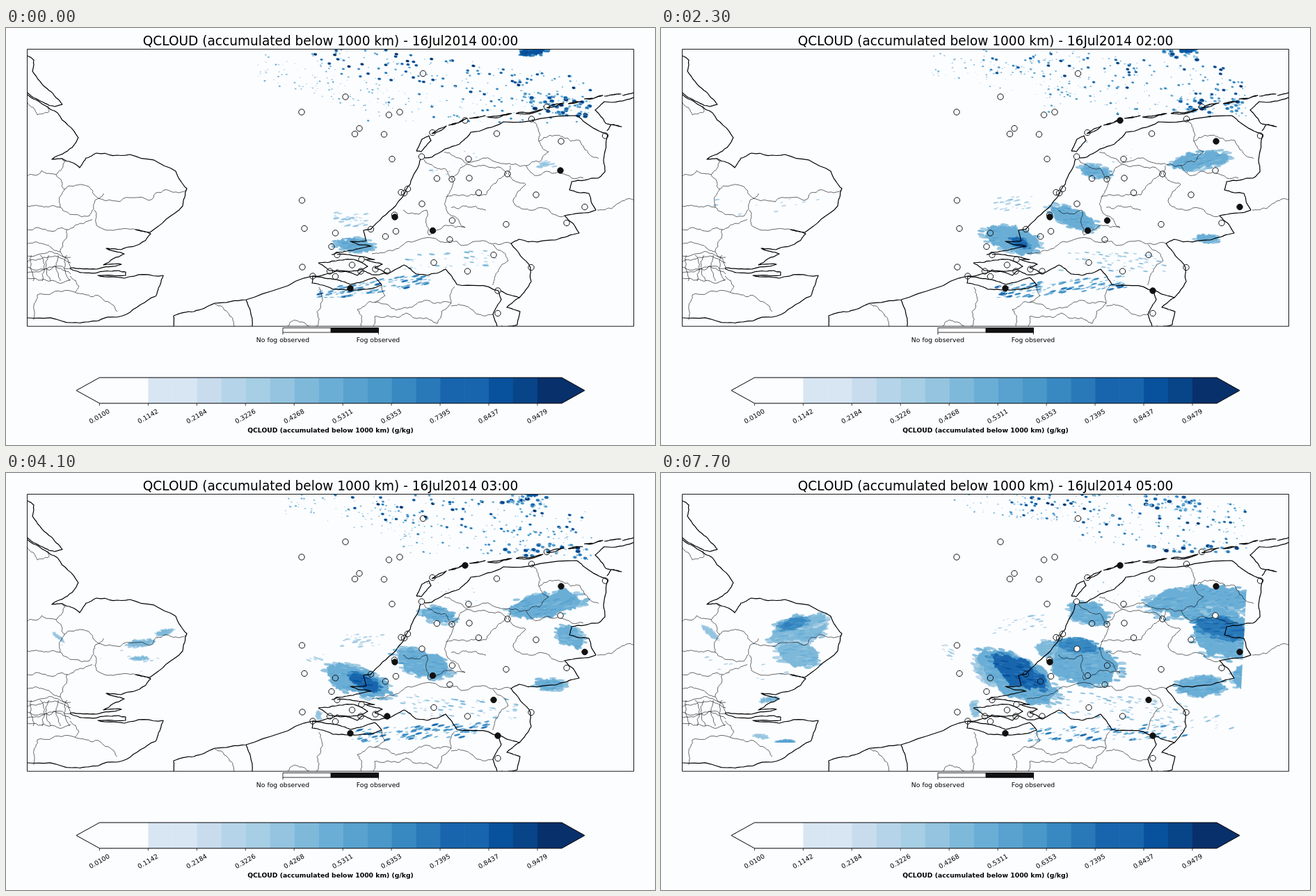
Write an HTML page that moves like this. It is 933 px wide and 600 px high and loops after 8000 ms.

```html
<!DOCTYPE html>
<html lang="en">
<head>
<meta charset="utf-8">
<title>Cloud water forecast</title>
<style>
html, body { margin: 0; width: 100%; height: 100%; overflow: hidden; background: #fcfdff; }
svg { display: block; width: 100vw; height: 100vh; }
text { font: 9.27px "DejaVu Sans", sans-serif; text-anchor: middle; fill: #000; }
#title { font-size: 18.55px; }
.bold { font-weight: bold; }
#coast, #border { fill: none; stroke: #000; stroke-linejoin: round; }
#coast { stroke-width: 1.2; }
#border { stroke-width: .6; }
#stations circle { stroke: #111; stroke-width: 1; }
</style>
</head>
<body>
<svg viewBox="0 0 933 600">
<defs>
  <clipPath id="domain"><path d="M31 31H849L834 312 830 388H31z"/></clipPath>
  <clipPath id="frame"><path d="M31 31H902V429H31z"/></clipPath>
</defs>
<g id="clouds" clip-path="url(#domain)"></g>
<g clip-path="url(#frame)">
<g id="coast">
  <polyline points="31,40 40,46 38,62 62,90 81,110 70,113 42,101 31,93"/>
  <polyline points="31,96 55,111 74,122 104,158 95,172 66,189 81,188 106,201 115,187 130,180 178,182 244,206 260,231 254,256 207,294 186,290"/>
  <polyline points="186,290 208,296 200,306 165,319 144,317 170,325 140,341 166,340 130,347 92,345"/>
  <polyline points="92,346 110,352 150,350 172,351 172,356 132,356 170,360 226,356 221,371 215,386 173,412 118,423 95,424 31,417"/>
  <polyline points="241,429 241,414 270,408 300,396 345,391 441,357 475,362 495,369 530,359 540,370 505,377 470,376 440,367 441,357"/>
  <polyline points="345,391 354,418 354,429"/>
  <polyline points="449,338 475,335 500,333 520,343 497,350 465,349 449,338"/>
  <polyline points="441,357 466,353 476,348 505,356 513,349 526,355 548,353"/>
  <polyline points="476,326 512,329 530,333 516,333 541,340 530,345 548,353"/>
  <polyline points="468,326 490,321 525,314 495,307 518,306 514,291 524,290 560,256 581,225 597,186 612,186"/>
  <polyline points="612,186 652,167 668,150 715,135 820,126 834,137 865,154 859,190 861,207 851,216 813,221 810,233 838,238 848,262 803,270 824,295 790,305 738,304 726,310 754,345 755,365 738,388 711,378"/>
  <polyline points="902,100 860,106 847,118 862,137 885,142 870,139 864,148"/>
  <polyline points="590,177 598,160 608,155 611,162 597,178 590,177"/>
  <polyline points="612,152 633,141 622,149 612,152"/>
  <polyline points="636,140 663,130 648,137 636,140"/>
  <polyline points="666,130 689,126 666,130"/>
  <polyline points="692,128 727,123 708,129 692,128"/>
  <polyline points="733,123 772,117 745,124 733,123"/>
  <polyline points="777,115 802,108 777,115"/>
  <polyline points="808,109 829,106 808,109"/>
  <polyline points="831,102 858,97 831,102"/>
  <polyline points="860,98 884,95 860,98"/>
  <polyline points="886,97 902,93"/>
  <polyline points="548,353 572,341 590,354 605,356 632,347 648,369 708,378 712,390 700,412 706,429"/>
  <polyline points="738,388 720,402 739,408 735,427 712,429"/>
</g>
<g id="border">
  <polyline points="31,107 45,125 62,120 60,112"/>
  <polyline points="31,213 72,211 85,192 80,187"/>
  <polyline points="72,211 84,232 120,229 125,238 205,248 259,233"/>
  <polyline points="84,232 78,258 120,270 128,248 140,238"/>
  <polyline points="31,256 78,258"/>
  <polyline points="127,262 130,284 186,290"/>
  <polyline points="31,290 88,290 124,275"/>
  <polyline points="88,290 78,322 93,345"/>
  <polyline points="31,310 58,312 78,322"/>
  <polyline points="92,357 105,372 100,380"/>
  <polyline points="40,420 45,384 115,384 160,408"/>
  <polyline points="756,131 766,163 800,156 825,162 852,188"/>
  <polyline points="766,163 780,178 748,198 765,212 830,216"/>
  <polyline points="748,198 716,195 662,195 657,190 630,179"/>
  <polyline points="725,198 722,210 747,225 729,249 758,262 803,270"/>
  <polyline points="641,217 660,197 720,209 690,240 633,243 641,217 630,202 597,186"/>
  <polyline points="571,262 605,262 608,298 660,287 633,262 633,243"/>
  <polyline points="640,258 660,256 690,262"/>
  <polyline points="526,325 560,318 625,308 655,313 726,310"/>
  <polyline points="700,312 722,335 708,350 700,370"/>
  <polyline points="450,373 455,390 447,429"/>
  <polyline points="540,370 545,385 505,405 510,429"/>
  <polyline points="530,395 580,402 640,396 645,372"/>
  <polyline points="640,396 620,425 575,410 530,415 528,429"/>
  <polyline points="640,400 680,412 700,412"/>
  <polyline points="300,397 328,429"/>
  <polyline points="405,429 415,420 447,429"/>
  <polyline points="850,262 870,260 902,247"/>
</g>
</g>
<g id="stations"></g>
<path d="M30.5 30.5H902.5V429.2H30.5z" fill="none" stroke="#000" stroke-width=".9"/>
<path d="M398 431.5H535.5V438H398z" fill="#fff" stroke="#000" stroke-width=".8"/>
<path d="M467 431.5H535.5V438H467zM398 438v3M535.5 438v3" fill="#111" stroke="#000" stroke-width=".8"/>
<text x="398" y="452">No fog observed</text>
<text x="535" y="452">Fog observed</text>
<g id="scale"></g>
<path d="M134.5 503H799L832 521.5 799 540H134.5L101 521.5z" fill="none" stroke="#000"/>
<text class="bold" x="466.5" y="581.5">QCLOUD (accumulated below 1000 km) (g/kg)</text>
<text id="title" x="466.5" y="24.5"></text>
</svg>
<script>
const $ = id => document.getElementById(id);
const tones = ['#d8e6f3', '#c8dcee', '#b5d4e9', '#a6cee4', '#94c4df', '#7fb9da', '#6aaed6', '#59a2cf',
  '#4a98c9', '#3888c1', '#2979b9', '#1865ad', '#08519c', '#084488', '#08306b'];
let seed = 1;
const rnd = () => (seed = seed * 16807 % 2147483647) / 2147483647;
const spread = size => (rnd() - .5) * size;
const parse = s => s.trim().split(/\s+/).map(p => p.split(',').map(Number));
const join = pts => pts.map(p => p.map(v => v.toFixed(1)).join()).join(' ');

// Midpoint displacement: bends every segment sideways
function rough(pts, amp, depth) {
  if (!depth) return pts;
  const out = [pts[0]];
  for (let i = 1; i < pts.length; i++) {
    const [x, y] = pts[i - 1], [u, v] = pts[i], k = spread(2 * amp);
    out.push([(x + u) / 2 - (v - y) * k, (y + v) / 2 + (u - x) * k], pts[i]);
  }
  return rough(out, amp, depth - 1);
}

// Coastlines bend less than inland borders
function drawLand() {
  for (let i = 0; i < 5; i++) {
    const x = 36 + i * 13, y = 328 + i * 8;
    for (const line of [`31,${y} 93,${y + 2}`, `${x},327 ${x + 3},364`])
      $('border').insertAdjacentHTML('beforeend', `<polyline points="${line}"/>`);
  }
  for (const [id, amp, depth] of [['coast', .07, 3], ['border', .17, 4]])
    for (const line of $(id).children)
      line.setAttribute('points', join(rough(parse(line.getAttribute('points')), amp, depth)));
}

let art, hour;
// Values on the way from the first hour of a feature to the last hour
const between = (first, a, b) => a.map((v, i) => v + (b[i] - v) * (hour - first) / Math.max(1, 5 - first));

function speck(x, y, r, level, long, tilt) {
  const f = v => v.toFixed(1), w = r * long, h = r / Math.sqrt(long);
  art += `<ellipse rx="${f(w)}" ry="${f(h)}" transform="translate(${f(x)} ${f(y)}) rotate(${tilt})" fill="${tones[level]}"/>`;
}

// Specks strewn along a line: x0, y0, x1, y1, height, count
function field(first, a, b, size, top, long = 1.3, tilt = 8) {
  if (hour < first) return;
  const [x0, y0, x1, y1, height, count] = between(first, a, b);
  for (let i = 0; i < count; i++) {
    const t = rnd(), k = rnd() ** 1.5, r = size * (.4 + .6 * k);
    const x = x0 + (x1 - x0) * t, y = y0 + (y1 - y0) * t + spread(height);
    const level = Math.round(top * (.2 + .8 * k));
    if (level > 6) speck(x, y, r * 1.25, 3, long, tilt);
    speck(x, y, r, level, long, tilt);
  }
}
const streaks = (first, a, b, size, top, tilt) => field(first, a, b, size, top, 2.3, tilt);

// Ragged oval with a pale rim, frayed edge and streaked inside: x, y, rx, ry, tilt
function cloud(first, a, b, level = 6) {
  if (hour < first) return;
  const [cx, cy, rx, ry, tilt] = between(first, a, b);
  const turn = tilt * Math.PI / 180, cos = Math.cos(turn), sin = Math.sin(turn);
  const at = (angle, r) => {
    const x = Math.cos(angle) * rx * r, y = Math.sin(angle) * ry * r;
    return [cx + x * cos - y * sin, cy + x * sin + y * cos];
  };
  const size = Math.min(2.6, ry / 3);
  for (let i = 0; i < rx * .7; i++)
    speck(...at(rnd() * 7, .92 + rnd() * .2), size, Math.max(0, level - 1 - Math.floor(rnd() * 3)), 2, tilt / 2);
  const ring = Array.from({ length: 14 }, (_, i) => at(i * Math.PI / 7, .88 + rnd() * .2));
  art += `<path d="M${join(rough([...ring, ring[0]], .3, 3))}z" fill="${tones[level]}" stroke="${tones[Math.max(0, level - 2)]}"/>`;
  for (let i = 0; i < rx * ry / 22; i++) {
    const shade = level + (rnd() < .6 ? 1 : -1);
    speck(...at(rnd() * 7, Math.sqrt(rnd()) * .85), size * (.3 + rnd() * .5), Math.min(14, shade), 3, tilt / 2 - 8);
  }
}

function drawSky() {
  // North Sea showers
  field(0, [362, 55, 560, 108, 42, 110], [420, 36, 640, 62, 34, 60], 1.3, 6);
  field(0, [430, 38, 842, 95, 46, 180], [500, 42, 842, 66, 44, 150], 1.9, 14);
  field(0, [500, 112, 842, 116, 44, 100], [600, 80, 842, 100, 40, 70], 1.5, 10);
  field(0, [740, 107, 842, 116, 28, 75], [700, 108, 842, 112, 14, 22], 2.6, 14);
  field(0, [740, 33, 780, 36, 8, 6], [695, 40, 775, 46, 20, 48], 2.6, 14);
  cloud(0, [757, 33, 20, 7, -8], [757, 30, 0, 0, 0], 12);
  field(0, [600, 165, 690, 190, 34, 8], [600, 165, 690, 185, 34, 22], 1.1, 4);

  // Thin streaks off the coast and inland
  streaks(0, [472, 275, 520, 276, 20, 36], [478, 222, 555, 212, 20, 24], 2, 4, -10);
  streaks(3, [435, 268, 458, 264, 8, 8], [405, 250, 425, 268, 16, 14], 1.8, 3, 20);
  streaks(0, [762, 198, 790, 194, 10, 14], [762, 198, 790, 194, 10, 14], 2.4, 4, -10);
  streaks(0, [608, 205, 642, 209, 8, 8], [608, 205, 642, 209, 8, 8], 1.8, 6, 0);
  streaks(2, [75, 250, 230, 262, 30, 14], [60, 270, 215, 300, 24, 14], 1.8, 3, -8);
  streaks(0, [570, 338, 705, 330, 22, 44], [570, 330, 755, 348, 36, 100], 1.9, 5, 8);
  streaks(0, [450, 384, 610, 360, 18, 150], [530, 376, 755, 372, 22, 120], 2.1, 11, -14);
  streaks(4, [710, 368, 805, 358, 30, 26], [700, 365, 828, 358, 20, 16], 1.9, 4, -20);

  // Eastern England
  cloud(3, [194, 245, 19, 5, -8], [196, 228, 43, 21, -15], 5);
  cloud(3, [192, 267, 13, 3, 0], [197, 261, 32, 18, 10], 5);
  cloud(3, [228, 229, 13, 4, -15], [216, 213, 23, 9, -15], 5);
  cloud(4, [200, 231, 18, 5, -20], [190, 217, 20, 8, -15], 9);
  cloud(3, [75, 236, 11, 2.5, 40], [70, 229, 16, 4, 40], 4);
  cloud(4, [156, 328, 8, 2.5, -5], [155, 326, 13, 4, -8], 5);
  cloud(4, [146, 378, 6, 2, 5], [143, 379, 11, 3.5, 10], 4);
  cloud(5, [179, 387, 13, 3.5, 0], [179, 387, 13, 3.5, 0], 7);

  // Dutch coast
  cloud(3, [449, 348, 4, 6, 0], [450, 339, 6, 12, -15], 4);
  cloud(4, [478, 290, 24, 12, 35], [472, 284, 26, 17, 45], 4);
  cloud(0, [500, 312, 27, 11, 5], [512, 293, 66, 26, 30]);
  cloud(2, [516, 309, 13, 7, 20], [513, 286, 44, 17, 31], 11);

  // Inland banks
  cloud(1, [628, 208, 19, 7, 10], [614, 201, 31, 16, 12]);
  cloud(1, [591, 272, 8, 7, 30], [566, 252, 27, 13, 0], 5);
  cloud(2, [592, 273, 38, 13, 22], [612, 276, 50, 29, 8]);
  cloud(4, [594, 254, 25, 6, 0], [600, 249, 29, 10, 6], 9);
  cloud(1, [788, 302, 10, 4, 5], [776, 307, 34, 14, 0]);
  cloud(4, [838, 294, 9, 11, 0], [837, 294, 15, 18, 0]);
  cloud(1, [775, 192, 28, 9, -12], [778, 187, 82, 23, -3]);
  cloud(3, [812, 236, 22, 14, 30], [810, 231, 46, 36, 10]);
  cloud(4, [806, 232, 17, 8, 10], [806, 223, 40, 15, 12], 10);
}

drawLand();
const skies = Array.from({ length: 6 }, (_, i) => {
  hour = i;
  seed = 7919 + i * 104;
  art = '';
  drawSky();
  return art;
});

const spots = parse(`599.5,65.5 488,99 425,121 550.5,125 566,121 508,144.5 501.5,152.5 543.5,153 555,188.5 597.5,185
  613,150.5 660,133 705.5,152 755.5,131 777.5,113.5 861.5,155 798,163 665,188.5 619.5,216.5 641,217.5
  666,216 721,210 797,205 679.5,237 762,240 832,257.5 577.5,231.5 568,236.5 572.5,237.5 598,253
  558.5,269 559,272 641.5,277 613.5,291.5 719,282.5 806,280.5 425.5,248 429,288.5 473.5,295 524.5,289.5
  560.5,292.5 545.5,300 638,304.5 468,314.5 476,326.5 511,333 497.5,341 531,347 548,350 465.5,350
  510,350 473.5,357.5 441,357 426,344 495,374.5 615,337.5 663.5,350 701,326.5 755,344.5 707,378 707,410.5`);
$('stations').innerHTML = spots.map(([x, y]) => `<circle cx="${x}" cy="${y}" r="4.2"/>`).join('');
// Hours with fog, by station
const fog = { 11: '2345', 16: '12345', 22: '01', 25: '12345', 31: '02345', 32: '2', 33: '0123', 34: '4',
  48: '3', 54: '012345', 57: '345', 59: '12345' };
const clear = [9, 22, 29];

const step = 34.97;
const steps = ['#fcfdff', '#fcfdff', tones[0], ...tones.slice(0, 12), ...tones.slice(11)];
$('scale').innerHTML =
  steps.map((c, i) => `<rect x="${134.5 + i * step}" y="503" width="${step + .3}" height="37" fill="${c}"/>`).join('') +
  `<path d="M799 503L832 521.5 799 540z" fill="${tones[14]}"/>` +
  Array.from({ length: 10 }, (_, i) => {
    const x = 134.5 + i * 2 * step;
    return `<path d="M${x} 540v3.5" stroke="#000" stroke-width=".7"/>
      <text transform="translate(${x - .5} 558.5) rotate(-30)" y="3.4">${(.01 + i * .10421).toFixed(4)}</text>`;
  }).join('');

let shown = -1;
function show(h) {
  shown = h;
  $('title').textContent = `QCLOUD (accumulated below 1000 km) - 16Jul2014 0${h}:00`;
  $('clouds').innerHTML = skies[h];
  [...$('stations').children].forEach((dot, i) =>
    dot.setAttribute('fill', fog[i]?.includes(h) ? '#111' : clear.includes(i) ? '#fcfdff' : 'none'));
}
function tick() {
  const t = performance.now() % 8000;
  const h = Math.floor((t + 1300) / 1800);
  if (h !== shown) show(h);
  requestAnimationFrame(tick);
}
tick();
</script>
</body>
</html>
```
